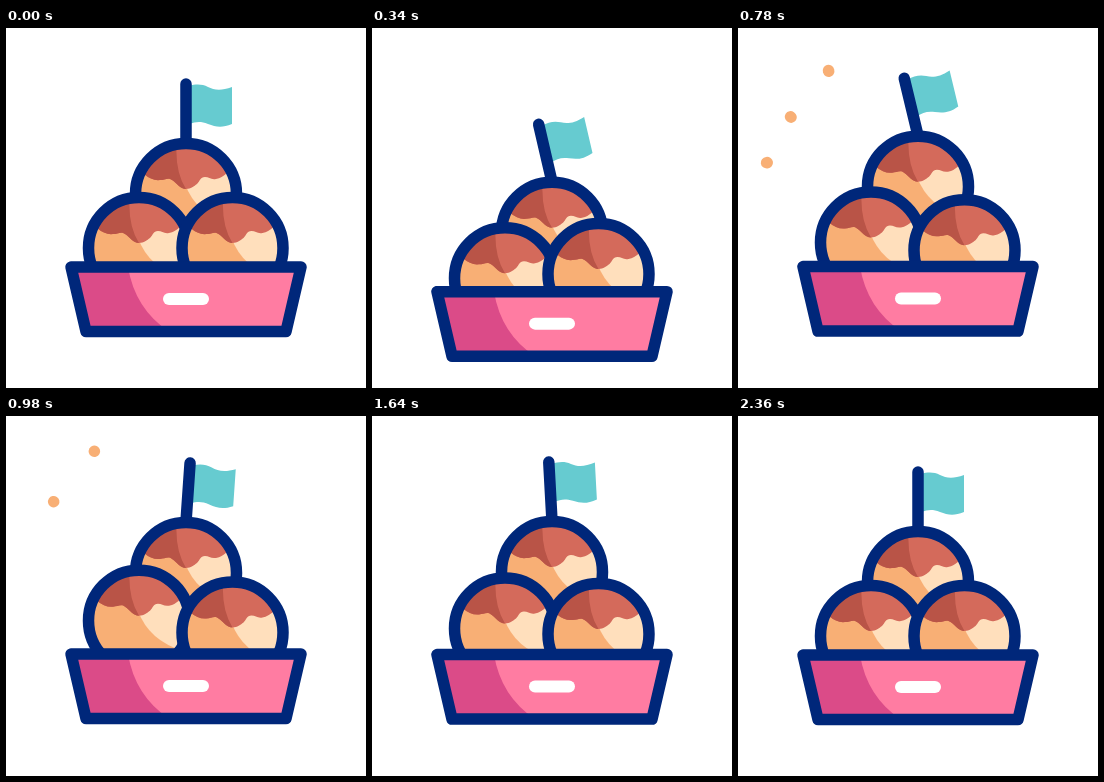
An HTML page that plays this animation: 360 by 360 pixels, repeating every 2.4 s.

```html
<!DOCTYPE html>
<html lang="en">
<head>
<meta charset="utf-8">
<style>
html, body { margin: 0; width: 100%; height: 100%; overflow: hidden; background: #fff; }
svg { display: block; width: 100%; height: 100%; }
.line { stroke: #00277a; stroke-width: 11.5; stroke-linecap: round; stroke-linejoin: round; }
</style>
</head>
<body>
<svg viewBox="0 0 360 360">
  <defs>
    <clipPath id="round"><circle r="50.5"/></clipPath>
    <clipPath id="shade"><path d="M-55-55H-9Q-12-24 0-5V0H-55Z"/></clipPath>
    <path id="sauce" d="M-55-26L-42-20Q-34-13-26-14C-21-14-18-17-14-14C-9-11-6-5 0-5C5-5 8-8 11-10C14-13 14-17 19-17C23-17 25-14 30-15Q36-16 42-22L55-30V-55H-55Z"/>
    <g id="ball">
      <g clip-path="url(#round)">
        <circle r="51" fill="#f8af75"/>
        <path d="M-1-10Q10 20 44 30L60 0 45-30Z" fill="#ffdfbc"/>
        <use href="#sauce" fill="#d46a5b"/>
        <use href="#sauce" fill="#b95447" clip-path="url(#shade)"/>
      </g>
      <circle r="50.5" fill="none" class="line"/>
    </g>
    <path id="box" d="M65 239H295L280 303.500H80Z"/>
  </defs>
  <g id="sprinkles" fill="#f8af75"></g>
  <g id="flag">
    <path d="M183 58C190 56 196 56 202 59S215 63 226 59V96C216 100 210 99 202 96S190 94 183 96Z" fill="#66cbd0"/>
    <path d="M180 56V115" class="line"/>
  </g>
  <use id="top" href="#ball"/>
  <use id="left" href="#ball"/>
  <use id="right" href="#ball"/>
  <g id="tray">
    <use href="#box" fill="#ff7ca2"/>
    <path d="M65 239H122Q129 281 163 303.500H80Z" fill="#db4b88"/>
    <use href="#box" fill="none" class="line"/>
    <rect x="157" y="265" width="46" height="12" rx="6" fill="#fff"/>
  </g>
</svg>
<script>
const LOOP = 2400;
const $ = id => document.getElementById(id);
const clamp = u => Math.min(1, Math.max(0, u));
const ease = (t, from, to) => (1 - Math.cos(Math.PI * clamp((t - from) / (to - from)))) / 2;

// Everything sinks together, springs back by its own time, then bobs until it settles.
function spring(t, { depth, up, lift, swing, peak, period = 740, settle = 950 }) {
  const sink = depth * (ease(t, 0, 400) - ease(t, 450, up));
  const bob = lift + swing * Math.cos(2 * Math.PI * (t - peak) / period);
  return sink - bob * (ease(t, 500, 850) - ease(t, settle, 2250));
}

const motion = {
  tray: { depth: 26, up: 700, lift: 0.5, swing: 0.5, peak: 980 },
  top: { depth: 41, up: 665, lift: 6, swing: 4, peak: 900, settle: 1640 },
  left: { depth: 32, up: 930, lift: 10.6, swing: 6.2, peak: 900 },
  right: { depth: 27.5, up: 930, lift: 7.5, swing: 5.5, peak: 1260, settle: 1640 },
  tilt: { depth: -13.8, up: 1000, lift: 3.6, swing: 7.6, peak: 1230, period: 500 }
};

const place = (id, x, y, extra = "") =>
  $(id).setAttribute("transform", `translate(${x} ${y}) ${extra}`);

// Sprinkles fan out from behind the top ball, slow down and shrink away.
const sprinkles = [98, 85, 111].map((reach, i) => {
  const node = document.createElementNS("http://www.w3.org/2000/svg", "ellipse");
  node.id = "sprinkle" + i;
  $("sprinkles").append(node);
  return { node, reach, angle: 172 + 41 * i, startY: 122 + 10 * i, fade: i ? 980 : 850 };
});

function drawSprinkle({ node, reach, angle, startY, fade }, t) {
  const rest = (1 - clamp((t - 500) / 480)) ** 3;
  const size = t < 500 ? 0 : 1 - clamp((t - fade) / 100);
  node.setAttribute("rx", (5.8 + 4.5 * rest) * size);
  node.setAttribute("ry", 5.8 * size);
  place(node.id, 119, startY, `rotate(${angle}) translate(${reach * (1 - rest)})`);
}

function draw(t) {
  const at = name => spring(t, motion[name]);
  place("tray", 0, at("tray"));
  place("top", 180, 166 + at("top"));
  place("left", 133, 220 + at("left"));
  place("right", 226.5, 220 + at("right"));
  place("flag", 0, at("top"), `rotate(${at("tilt")} 180 115)`);
  sprinkles.forEach(s => drawSprinkle(s, t));
}

const start = performance.now();
(function frame() {
  draw((performance.now() - start) % LOOP);
  requestAnimationFrame(frame);
})();
</script>
</body>
</html>
```
